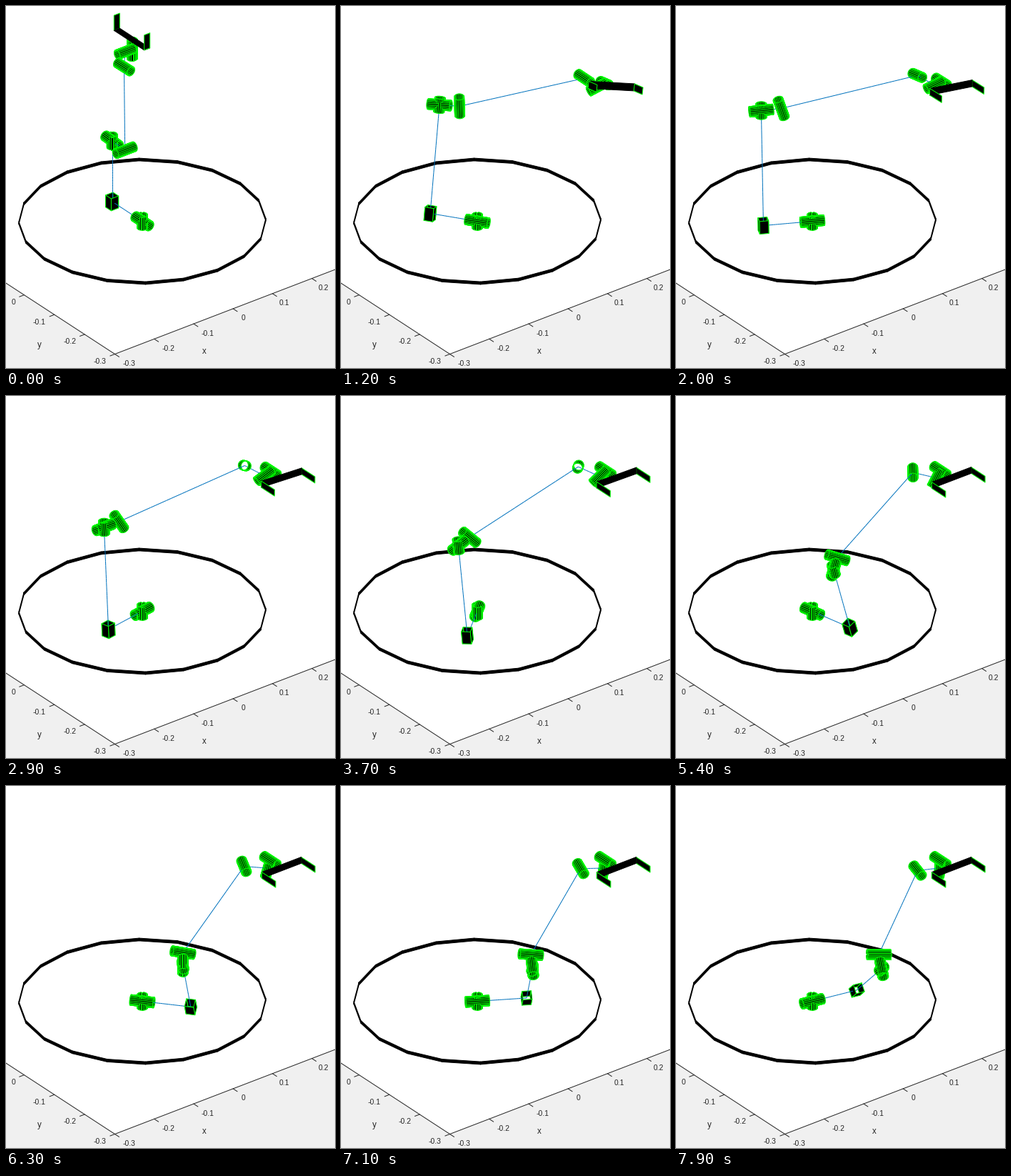
A matplotlib script that plays this animation: 461x507 px, repeating every 8000 ms.

```python
import numpy as np
import matplotlib.pyplot as plt
from matplotlib.animation import FuncAnimation
from matplotlib.collections import PolyCollection

W, H, DPI = 461, 507, 128
PX = 72 / DPI                     # points per pixel
FRAMES, STEP = 80, 100
SCALE = 696                       # pixels per world unit
GREEN, BLUE, BLACK, INK = "#00ff00", "#0072bd", "#000000", "#262626"

# Orthographic view, azimuth -37.5, elevation 30; third value is depth towards the eye
AZ, EL = np.radians([37.5, 30])
VIEW = SCALE * np.array([
    [np.cos(AZ), -np.sin(AZ) * np.sin(EL), -np.sin(AZ) * np.cos(EL)],
    [-np.sin(AZ), -np.cos(AZ) * np.sin(EL), -np.cos(AZ) * np.cos(EL)],
    [0, -np.cos(EL), np.sin(EL)],
])
BASE = np.array([190.5, 301, 0])


def view(x, y, z=0):
    return np.array([x, y, z]) @ VIEW


# ---- keyed joint motion ----
TIMES = np.array([0, 1.2, 2.0, 2.9, 4.5, 6.3, 7.9])


def warp(t):
    return t + 1.5 * (1 - np.exp(-2.4 * t))


def track(keys, clock=warp):
    """Smooth cubic curve through the keys."""
    x = clock(TIMES)
    y = np.array(keys, float)
    m = np.gradient(y, x, axis=0)

    def at(t):
        s = clock(t)
        i = int(np.clip(np.searchsorted(x, s) - 1, 0, len(x) - 2))
        h = x[i + 1] - x[i]
        u = (s - x[i]) / h
        return ((1 + 2 * u) * (1 - u) ** 2 * y[i] + u * (1 - u) ** 2 * h * m[i]
                + u * u * (3 - 2 * u) * y[i + 1] + u * u * (u - 1) * h * m[i + 1])
    return at


turn = track([127.5, 161.5, 190, 227, 288, 347, 386.6], lambda t: t)
slide = track([(0, .141), (-.059, .22), (-.025, .253), (-.012, .2325),
               (-.033, .18), (-.07, .1356), (-.112, .1076)])
elbow = track([(18, 13, 21), (28, 2, 8), (28, -3, -4), (21, -8, -19),
               (11, -15, -22), (0, -18, -24), (-4, -20, -22)])
elbow_axis = track([(26, -10), (1, 26), (9, 25), (14, 20), (26, 13), (31, 5), (33, 0)])
wrist = track([(-11, 39), (-38, -11), (-47, -17), (-51.5, -17),
               (-54.5, -12.5), (-52.5, -2), (-47.5, 4)])
wrist_axis = track([(19, 12), (18, 12), (14, 6), (4, 1), (-4, 10), (7, 17), (12, 15)])
roll = track([90, 30, 15, 22, 40, 70, 85])


# ---- shapes: lists of (points, face, edge) ----
def unit(v):
    return v / np.linalg.norm(v)


def lift(axis, length, sign):
    """Give a flat axis the depth it needs to have this length."""
    return np.array([*axis, sign * np.sqrt(max(length ** 2 - axis @ axis, 0))])


def tube(c, axis, r, n=20, ref=None):
    """Open prism around c; the axis vector spans its whole length."""
    if ref is None:
        ref = np.eye(3)[np.argmin(np.abs(axis))]
    e1 = unit(ref - axis * (ref @ axis) / (axis @ axis))
    e2 = np.cross(unit(axis), e1)
    a = (np.arange(n + 1) + .5) * 2 * np.pi / n
    rim = r * (np.outer(np.cos(a), e1) + np.outer(np.sin(a), e2))
    lo, hi = c - axis / 2 + rim, c + axis / 2 + rim
    return [(np.array([lo[k], lo[k + 1], hi[k + 1], hi[k]]), BLACK, GREEN)
            for k in range(n)]


def link(a, b, n=24):
    p = a + np.outer(np.linspace(0, 1, n + 1), b - a)
    return [(p[k:k + 2], "none", BLUE) for k in range(n)]


def plate(c, a, b, edge):
    return (np.array([c - a - b, c + a - b, c + a + b, c - a + b]), BLACK, edge)


def cycle(angle):
    """Weights that turn three axes into each other about their diagonal."""
    return [(1 + 2 * np.cos(np.radians(angle + d))) / 3 for d in (0, -120, 120)]


def arm(t):
    r, long, short = .0108 * SCALE, .048 * SCALE, .03 * SCALE
    phi = np.radians(turn(t)) - AZ
    u = view(np.cos(phi), np.sin(phi))
    v = view(-np.sin(phi), np.cos(phi))
    p, q = slide(t)
    rise = p * v + q * view(0, 0, 1)
    slider = BASE + .1 * u
    a = slider + rise
    ab = elbow(t)
    b = a + ab

    # hand position and orientation settle exponentially
    left = np.exp(-2.8 * t)
    hand = np.array([385.5 - 209.5 * left, 114 - 68 * left, 0])
    rest = 4 * np.degrees(np.arctan(np.tan(np.pi / 6) * np.exp(-1.27 * t)))
    k0, k1, k2 = cycle(120 - rest)
    ex, ez, ey = view(1, 0), view(0, 0, 1), view(0, -1)
    wide = k0 * ex + k1 * ez + k2 * ey
    fore = k0 * ez + k1 * ey + k2 * ex
    bar = k0 * ey + k1 * ex + k2 * ez

    c = hand + np.array([*wrist(t), 0])
    beta = np.radians(roll(t))
    side = np.cos(beta) * bar + np.sin(beta) * wide
    j9 = hand - (.037 - .014 * left) * fore
    j8 = j9 - .017 * side

    parts = tube(BASE, view(0, 0, .03), r) + tube(BASE, .048 * u, r)
    parts += tube(slider, .028 * SCALE * unit(rise), .0131 * SCALE, 4, u)
    parts += tube(a, short * unit(rise), r) + tube(a, long * unit(ab), r)
    parts += tube(b, lift(elbow_axis(t), long, -1), .0102 * SCALE)
    parts += tube(c, lift(wrist_axis(t), .043 * SCALE, 1), .0102 * SCALE)
    parts += tube(j8, .041 * side, .0102 * SCALE) + tube(j9, .045 * fore, .0102 * SCALE)

    finger = (.046 - .011 * left) / 2 * fore
    half = .00725 * wide
    parts.append(plate(hand, .05 * bar, half, BLACK))
    for s in (-.05, .05):
        parts.append(plate(hand + s * bar + finger, finger, half, GREEN))

    for start, end in ((BASE, slider), (slider, a), (a, b), (b, c), (c, j8)):
        parts += link(start, end)
    return sorted(parts, key=lambda s: s[0][:, 2].mean())


# ---- stage ----
fig = plt.figure(figsize=(W / DPI, H / DPI), dpi=DPI, facecolor="white")
ax = fig.add_axes([0, 0, 1, 1])
ax.set_xlim(-.5, W - .5)
ax.set_ylim(H - .5, -.5)
ax.axis("off")

corner = np.array([152, 487])
dx, dy = view(.1, 0)[:2], view(0, .1)[:2]
far_x, far_y = corner + 6 * dx, corner + 4 * dy
ax.fill(*zip(far_y, corner, far_x, (far_x[0], 600), (far_y[0], 600)),
        color="#f0f0f0", lw=0, zorder=0)


def stroke(a, b):
    ax.plot(*zip(a, b), color=INK, lw=PX, zorder=1)


def label(p, text, size=10.4):
    ax.text(*p, text, family="Liberation Sans", size=size * PX, color=INK,
            ha="center", va="center_baseline", zorder=1)


stroke(corner, far_x)
stroke(corner, far_y)
for i in range(6):
    at = corner + i * dx
    stroke(at, at + 7 * unit(-dy))
    text = f"{(i - 3) / 10:g}"
    label(at + (20 if i < 3 else 14 if i == 3 else 16.5, 12.5), text)
for i in range(4):
    at = corner + i * dy
    stroke(at, at - 7 * unit(dx))
    label(at + (-21 if i < 3 else -15, 9.5), f"{(i - 3) / 10:g}")
label((277, 482), "x", 11.5)
label((46, 473), "y", 11.5)

# low wall with twenty sides around the base
ang = np.arange(21) * np.pi / 10
rim = np.array([(BASE + view(.2487 * np.cos(s), .2487 * np.sin(s)))[:2] for s in ang])
up = np.array([0, 1.9])
wall = [[rim[k] - up, rim[k + 1] - up, rim[k + 1] + up, rim[k] + up] for k in range(20)]
ax.add_collection(PolyCollection(wall, facecolor=BLACK, edgecolor=BLACK,
                                 lw=PX, joinstyle="round", zorder=2))

body = PolyCollection([], lw=PX, joinstyle="round", zorder=3)
ax.add_collection(body)


def draw(i):
    pts, faces, edges = zip(*arm(i * STEP / 1000))
    body.set_verts([p[:, :2] for p in pts])
    body.set_facecolor(faces)
    body.set_edgecolor(edges)
    return body,


anim = FuncAnimation(fig, draw, frames=FRAMES, interval=STEP, repeat=True,
                     repeat_delay=0, blit=False)
plt.show()
```
